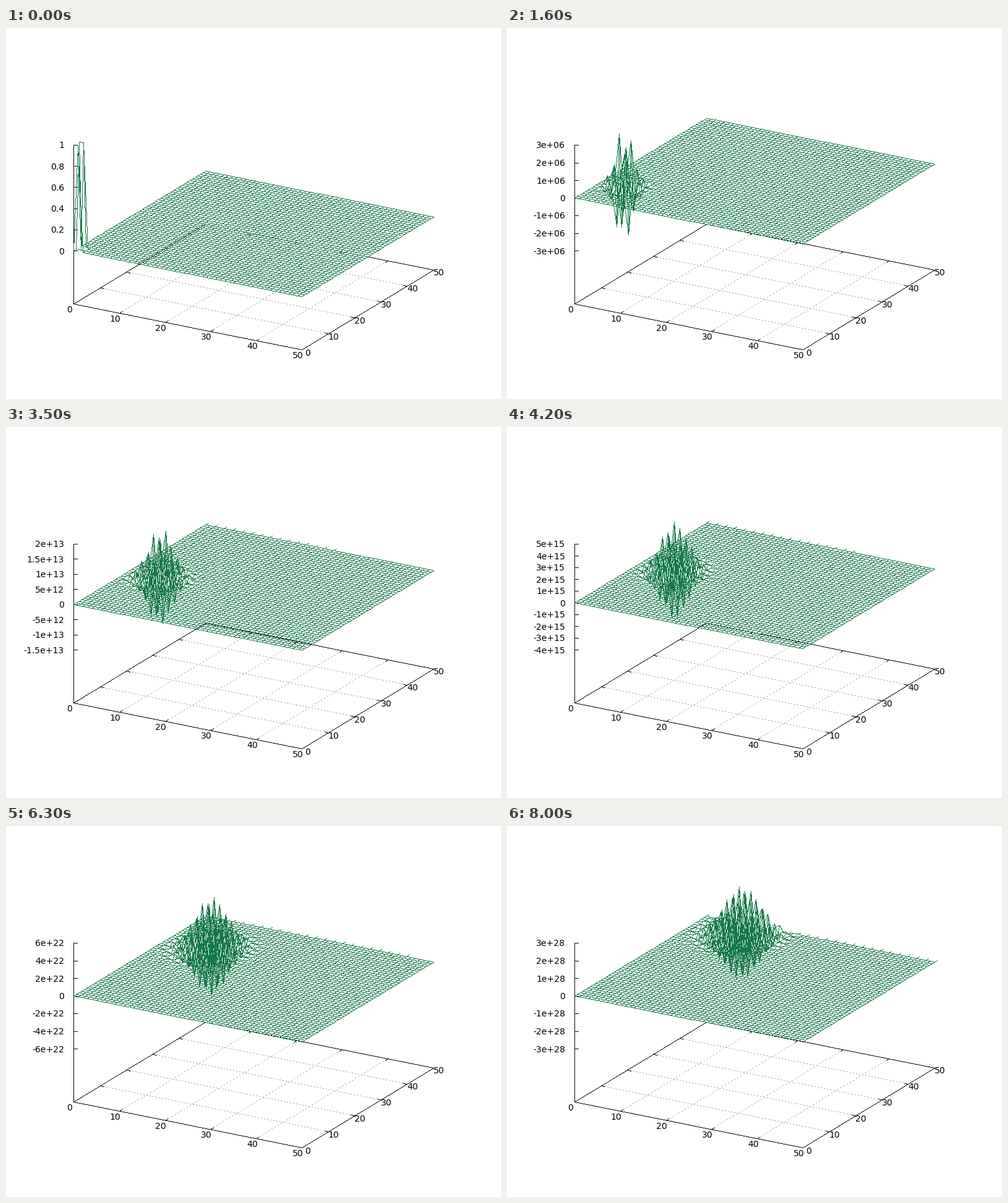
Recreate the animation shown at these times as a matplotlib script. Size 800 px wide and 600 px high, loop 8100 ms.

```python
import math

import numpy as np
import matplotlib.pyplot as plt
from matplotlib.animation import FuncAnimation

W, H, DPI = 800, 600, 100
STEPS, INTERVAL = 81, 100
N = 50
BLACK, GREEN, GRID = (0, 0, 0), (20, 120, 72), (160, 160, 160)
Z_TOP, Z_BOTTOM, FLOOR = 189, 360, 446

X, Y = np.meshgrid(np.arange(N + 1), np.arange(N + 1), indexing="ij")

# Logarithm of the growing peak at a few time steps
GROWTH_STEPS = [0, 1, 16, 28, 42, 55, 63, 80]
GROWTH_LOGS = [0, 1.08, 14.85, 24.73, 35.95, 46.2, 52.36, 65.4]


def project(x, y, level=FLOOR):
    """Oblique view: level is the screen height of the plane at the origin."""
    return np.stack([109 + 7.38 * x + 4.26 * y,
                     level + 1.48 * x - 2.58 * y], axis=-1)


def field(n):
    """Unstable wave packet drifting over the grid at time step n."""
    if n == 0:
        u = np.zeros(X.shape)
        u[1, 0] = u[0, 2] = u[1, 2] = 1
        return u
    root = math.sqrt(n)
    dx = (X - 0.3 - 1.17 * root) / (0.34 * root + 0.3)
    dy = (Y - 1.5 - 0.54 * n) / (0.44 * root)
    phase = math.pi * (X / 2 + Y + n) + 0.25
    u = np.exp(-(dx ** 2 + dy ** 2) / 2) * np.cos(phase)
    peak = math.exp(np.interp(n, GROWTH_STEPS, GROWTH_LOGS))
    high = 1.04 * peak * (1 - 0.7 * math.exp(-(n - 1) / 1.5))
    low = 0.97 * peak
    return np.where(u > 0, u * high / u.max(), u * low / -u.min())


def tick_range(low, high):
    span = high - low
    power = 10.0 ** math.floor(math.log10(span))
    lead = span / power
    step = power * (0.2 if lead < 2 else 0.5 if lead < 5 else 1)
    return math.floor(low / step), math.ceil(high / step), step


def rasterize(canvas, starts, ends, color, on=1, period=1):
    """Draw hard one-pixel lines, optionally dashed, between point arrays."""
    a = np.floor(np.reshape(starts, (-1, 2)) + 0.5).astype(int)
    d = np.floor(np.reshape(ends, (-1, 2)) + 0.5).astype(int) - a
    length = np.maximum(np.abs(d).max(axis=1), 1)
    count = length + 1
    line = np.repeat(np.arange(len(a)), count)
    along = np.arange(count.sum()) - np.repeat(np.cumsum(count) - count, count)
    shown = along % period < on
    line, along = line[shown], along[shown]
    t = (along / length[line])[:, None]
    px, py = np.floor(a[line] + d[line] * t + 0.5).astype(int).T
    inside = (px >= 0) & (px < W) & (py >= 0) & (py < H)
    canvas[py[inside], px[inside]] = color


def floor_line(canvas, x0, y0, x1, y1, color=BLACK, **dash):
    rasterize(canvas, project(x0, y0), project(x1, y1), color, **dash)


plt.rcParams["font.family"] = "DejaVu Sans"
fig = plt.figure(figsize=(W / DPI, H / DPI), dpi=DPI, facecolor="white")
ax = fig.add_axes([0, 0, 1, 1])
ax.axis("off")


def label(x, y, text="", ha="center"):
    return ax.text(x, y, text, ha=ha, va="center_baseline",
                   fontsize=14 * 72 / DPI, color="black")


base = np.full((H, W, 3), 255, dtype=np.uint8)
for v in range(10, N, 10):
    floor_line(base, v, 0, v, N, GRID, on=2, period=5)
    floor_line(base, 0, v, N, v, GRID, on=2, period=5)
    floor_line(base, v, 0, v, 1)
    floor_line(base, v, N, v, N - 1)
    floor_line(base, 0, v, 0.8, v)
    floor_line(base, N, v, N - 0.8, v)
for edge in (0, N):
    floor_line(base, 0, edge, N, edge)
    floor_line(base, edge, 0, edge, N)
rasterize(base, (109, Z_TOP), (109, FLOOR), BLACK)

for v in range(0, N + 1, 10):
    px, py = project(v, 0)
    label(px - 6.5, py + 8.5, str(v))
    px, py = project(N, v)
    label(px + 9, py + 4, str(v))

picture = ax.imshow(base, extent=(0, W, H, 0), aspect="auto",
                    interpolation="nearest")
z_labels = [label(94, 0, ha="right") for _ in range(16)]


def draw(n):
    u = field(n)
    first, last, step = tick_range(u.min(), u.max())
    scale = (Z_BOTTOM - Z_TOP) / (last - first)
    zero = Z_BOTTOM + first * scale
    canvas = base.copy()

    for i, text in enumerate(z_labels):
        k = first + i
        text.set_visible(k <= last)
        if k <= last:
            y = zero - k * scale
            rasterize(canvas, (109, y), (115, y), BLACK)
            text.set_text(f"{k * step:g}")
            text.set_y(y)

    points = project(X, Y, zero - u / step * scale)
    rasterize(canvas, points[:-1], points[1:], GREEN)
    rasterize(canvas, points[:, :-1], points[:, 1:], GREEN)
    if n > 34:
        # Loose line ends spread along the back edge
        ends = np.arange(0, min(N, int(0.6 * n + 7.5)) + 1, 2)
        rasterize(canvas, points[ends, N], project(ends, N + 1, zero), GREEN)
    picture.set_data(canvas)
    return [picture, *z_labels]


anim = FuncAnimation(fig, draw, frames=STEPS, interval=INTERVAL,
                     repeat=True, repeat_delay=0, blit=False)
plt.show()
```
